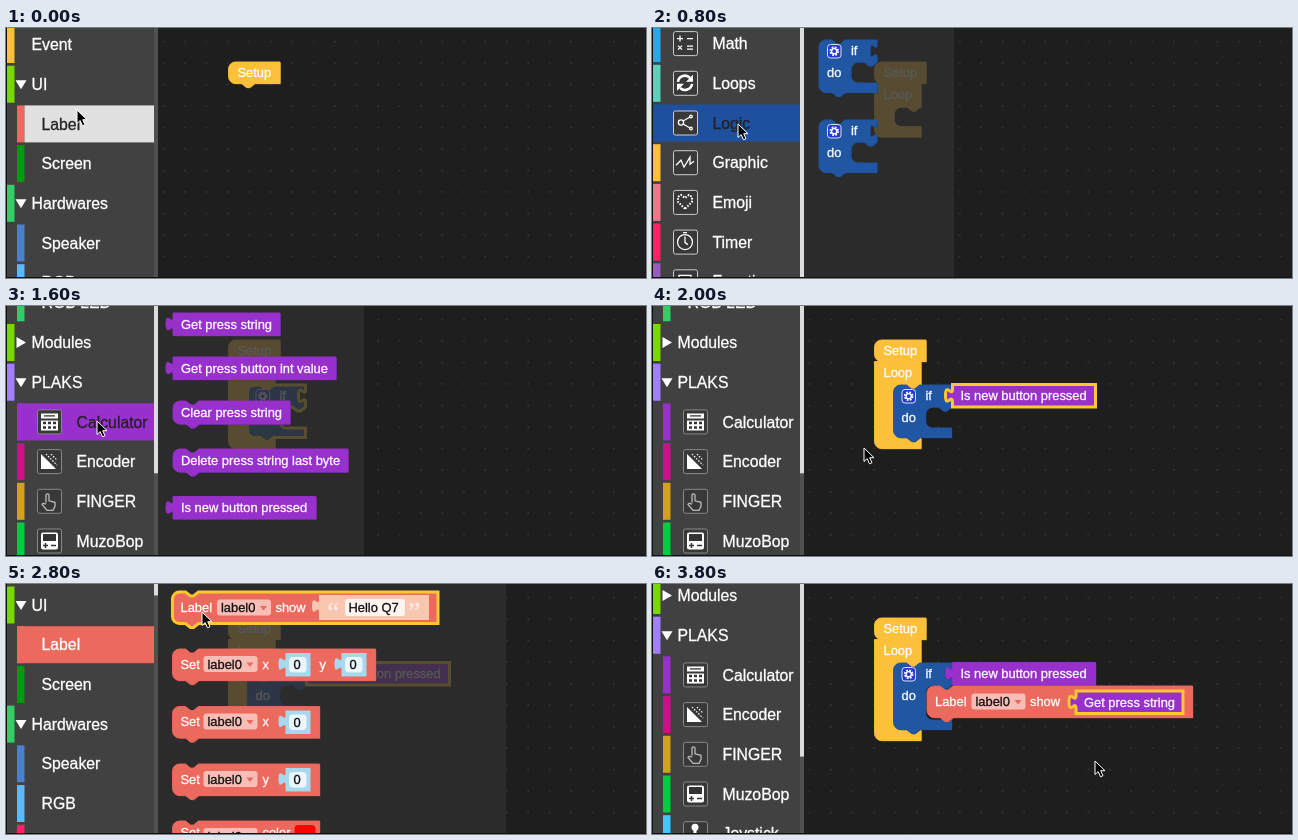
An HTML page for the animation above (4000 ms loop, 640 by 250 pixels).

```html
<!DOCTYPE html>
<html lang="en">
<head>
<meta charset="utf-8">
<title>Block editor</title>
<style>
html, body { margin: 0; width: 100%; height: 100%; overflow: hidden; background: #1e1e1e; }
svg { display: block; width: 640px; height: 250px; }
text { font-family: "Liberation Sans", Arial, sans-serif; font-size: 12.9px; fill: currentColor; stroke: currentColor; stroke-width: .3; white-space: pre; }
.row { font-size: 15.8px; }
.quote { font: 28px "Liberation Serif", serif; }
.icon { fill: none; stroke: #fff; stroke-width: 1.3; }
.icon .solid { fill: #fff; stroke: none; }
</style>
</head>
<body>
<svg viewBox="0 0 640 250">
  <defs>
    <pattern id="dots" x="18" y="3" width="21.45" height="21.5" patternUnits="userSpaceOnUse">
      <rect x="10.3" y="10" width="1.1" height="1.1" fill="#555"/>
    </pattern>
  </defs>
  <rect x="152" width="488" height="250" fill="#1e1e1e"/>
  <rect x="152" width="480" height="250" fill="url(#dots)"/>
  <g id="stage"></g>
  <g id="flyout"></g>
  <g id="sidebar"></g>
  <path d="M0 249.5H640M.5 0V250" stroke="#111"/>
  <g id="top"></g>
</svg>
<script>
const STEP = 200, COUNT = 20, PITCH = 39.7;
const YELLOW = '#fdc03a', BLUE = '#2156a2', PURPLE = '#9830cc', CORAL = '#eb695d', GREEN = '#34cc66';

// --- small svg helpers
const at = (x, y, body, extra = '') => `<g transform="translate(${x} ${y})" ${extra}>${body}</g>`;
const text = (x, y, s, color = '#fff', cls = '') => `<text x="${x}" y="${y}" color="${color}" class="${cls}">${s}</text>`;
const rect = (x, y, w, h, fill, rx = 0, extra = '') => `<rect x="${x}" y="${y}" width="${w}" height="${h}" rx="${rx}" fill="${fill}" ${extra}/>`;

// --- block outlines
const NOTCH = 'l5 4h3l5 -4', NOTCH_BACK = 'l-5 4h-3l-5 -4';
const TAB_DOWN = 'v4.4c0 8.7 -7 -7 -7 6.5s7 -2.2 7 6.5';
const TAB_UP = 'c0 -8.7 -7 7 -7 -6.5s7 2.2 7 -6.5';

function stackPath(w, h, { hat, joined, last, socket, inner } = {}) {
  let d = joined ? 'M0 0' : 'M0 7a7 7 0 0 1 7 -7';
  d += hat ? `H${w}` : `H13${NOTCH}H${w}`;
  if (socket) d += TAB_DOWN;
  if (inner) {
    const { x, y, h: ih } = inner;
    d += `V${y}H${x + 26}${NOTCH_BACK}H${x + 7}a7 7 0 0 0 -7 7v${ih - 14}a7 7 0 0 0 7 7H${w}`;
  }
  return d + `V${h}${last ? '' : 'H26' + NOTCH_BACK}H7a7 7 0 0 1 -7 -7Z`;
}
const valuePath = (w, h) => `M0 0H${w}V${h}H0V17.4${TAB_UP}Z`;

function shape(d, fill, selected) {
  const edge = selected ? 'stroke="#ffc72e" stroke-width="3"' : `stroke="${fill}" stroke-width=".9"`;
  return `<path d="${d}" transform="translate(.8 .8)" fill="${fill}" style="filter:brightness(.7)"/><path d="${d}" fill="${fill}" ${edge}/>`;
}

// --- blocks
const setup = (x, y) => at(x, y, shape(stackPath(51.5, 21.5, { hat: true }), YELLOW) + text(9, 15, 'Setup'));

const loop = (x, y, ih = 19.5, joined = true) => at(x, y,
  shape(stackPath(46.5, 23.5 + ih + 10.5, { joined, last: true, inner: { x: 19.5, y: 23.5, h: ih } }), YELLOW) + text(9, 15.5, 'Loop'));

const GEAR = rect(8.5, 4.5, 13.5, 13.5, '#2737d8', 3, 'stroke="#dde"') +
  '<circle cx="15.2" cy="11.2" r="3.9" fill="none" stroke="#fff" stroke-width="1.8" stroke-dasharray="1.8 1.27"/>' +
  '<circle cx="15.2" cy="11.2" r="2.6" fill="none" stroke="#fff" stroke-width="1.4"/>';

const ifBlock = (x, y, selected, ih = 21) => at(x, y,
  shape(stackPath(58, 22 + ih + 9.5, { socket: true, inner: { x: 32, y: 22, h: ih } }), BLUE, selected) +
  GEAR + text(32, 15, 'if') + text(8, 37, 'do'));

const value = (x, y, s, w, selected) => at(x, y, shape(valuePath(w, 22.5), PURPLE, selected) + text(8, 15.5, s));
const isNew = (x, y, selected) => value(x, y, 'Is new button pressed', 143, selected);
const getString = (x, y, selected) => value(x, y, 'Get press string', 107, selected);

const command = (x, y, s, w) => at(x, y, shape(stackPath(w, 23), PURPLE) + text(8, 15.5, s));

const dropdown = (x, y) => at(x, y, rect(0, 0, 54, 16, '#f7bdb6', 3) + text(4, 12.5, 'label0', '#111') +
  `<path d="M43 6.5h7l-3.5 4.5z" fill="${CORAL}"/>`);

const quoted = (x, y) => at(x, y, `<path d="${valuePath(110, 25)}" fill="#f9c6b0"/>` +
  text(8, 26, '“', '#fdebe3', 'quote') + rect(26, 4, 60, 17, '#fdf4f0', 3) +
  text(29.5, 17, 'Hello Q7', '#111') + text(89, 26, '”', '#fdebe3', 'quote'));

const labelShow = (x, y, selected, withValue = false) => at(x, y,
  shape(stackPath(265.5, 31.5), CORAL, selected) + text(8, 19.5, 'Label') + dropdown(44.5, 7.5) + text(103, 19.5, 'show') +
  (withValue ? '' : quoted(146.5, 3)));

const number = (x, y) => at(x, y, `<path d="${valuePath(25, 23.5)}" fill="#a6d8ee"/>` + rect(3.5, 4, 17.5, 15.5, '#eaf6fb', 4) + text(8, 16, '0', '#111'));

function setLabel(x, y, names, w) {
  let body = shape(stackPath(w, 31.5), CORAL) + text(8, 19.5, 'Set') + dropdown(31, 7);
  names.forEach((n, i) => {
    body += text(90 + i * 57, 19.5, n);
    body += n === 'color' ? rect(122, 4, 21, 20, '#f00', 4) : number(113 + i * 56, 4);
  });
  return at(x, y, body);
}

// --- flyouts: width and contents
const button = (x, y) => at(x, y, shape(stackPath(152, 54, { hat: true, last: true, inner: { x: 20, y: 23.5, h: 19.5 } }), YELLOW) + text(9, 16, 'Button A wasPressed'));
const FLYOUTS = {
  event: [190, () => loop(167, 12, 19.5, false) + button(167, 88)],
  logic: [150, () => ifBlock(167, 12) + ifBlock(167, 92)],
  calc: [206, () => getString(167, 7) + value(167, 51, 'Get press button int value', 163) +
    command(167, 95, 'Clear press string', 117) + command(167, 143, 'Delete press string last byte', 175) + isNew(167, 190.5)],
  label: [348, k => labelShow(166.5, 8, k === 14) + setLabel(166.5, 65, ['x', 'y'], 203) + setLabel(166.5, 122.5, ['x'], 147) +
    setLabel(166.5, 180, ['y'], 147) + setLabel(166.5, 237, ['color'], 147).replace(/y="19.5"/g, 'y="15.5"')]
};
function flyout(name, k) {
  if (!name) return '';
  const [w, draw] = FLYOUTS[name];
  return rect(152, 0, w, 250, 'rgba(47,47,47,.8)') + draw(k);
}

// --- workspace contents at each step
function stage(k) {
  const hasIf = k >= 6, hasLabel = k >= 16;
  let s = setup(222.5, 34);
  if (k >= 2) s += k === 2 ? loop(221, 54.5) : loop(222.5, 55.5, hasLabel ? 67 : hasIf ? 53 : 19.5);
  if (hasIf) s += ifBlock(241.5, 79, k < 9, hasLabel ? 35 : 21);
  if (k >= 10) s += isNew(300.5, 78.5, k < 15);
  if (hasLabel) s += labelShow(275, 102, k < 18, k === 19);
  if (k === 19) s += getString(424, 107, true);
  if (k === 5) s += ifBlock(248, 86, true);
  if (k === 9) s += isNew(307, 86, true);
  if (k === 15) s += labelShow(283, 110, true);
  if (k === 18) s += getString(431, 114, true);
  return s;
}

// --- sidebar rows: name, colour, kind (o open, c closed, s single, i indented), icon
const ICONS = {
  math: '<path d="M4 7.5h6M7 4.5v6M14 7.5h6M5 14.5l4 4M9 14.5l-4 4M14 15h6M14 18h6"/>',
  loops: '<path d="M5 11a7 7 0 0 1 12 -4M19 13a7 7 0 0 1 -12 4" stroke-width="2.6"/><path class="solid" d="M20 4v7h-7zM4 20v-7h7z"/>',
  logic: '<circle cx="8" cy="12" r="2.6"/><path d="M10 10.5l7 -4M10 13.5l7 4"/><circle cx="18" cy="6" r="1.3"/><circle cx="18" cy="18" r="1.3"/>',
  graphic: '<path d="M3 15l5 -5 3 7 6 -10v7l4 -3"/>',
  emoji: '<path d="M12 19l-7 -7v-5l3 -2 4 3 4 -3 3 2v5z" stroke-width="2" stroke-dasharray="1.6 1.4"/>',
  timer: '<circle cx="12" cy="12.5" r="7.5"/><path d="M12 7v6l3 2M10 3h4"/>',
  calc: '<path class="solid" d="M4 4h17v5h-17zM4 11h17v10h-17z"/><path d="M7 6.500h11" stroke="#333"/><path d="M6 13.500h14M6 18h14" stroke="#333" stroke-width="2.5" stroke-dasharray="3 2"/>',
  encoder: '<path class="solid" d="M4 5v15h15z"/><path d="M9 5l11 11M14 5l6 6" stroke-dasharray="1.5 1.5"/>',
  finger: '<path d="M9 14v-8q1.5 -2 3 0v6l6 1.5v4l-2 4h-6l-5 -6q1 -2 4 0" stroke="#bbb"/>',
  game: '<rect class="solid" x="4" y="4" width="17" height="17" rx="2"/><path d="M6 9h13" stroke="#333" stroke-width="7"/><path d="M6 17h5M8.5 14.5v5M14 17h5" stroke="#333" stroke-width="1.5"/>',
  stick: '<circle class="solid" cx="12" cy="6" r="3.5"/><path d="M12 8v8" stroke-width="3"/><path class="solid" d="M4 16h16v4h-16z"/>',
  plain: '<path d="M6 6h12v12h-12zM9 12h6"/>'
};
const ROWS = [
  ['Event', YELLOW, 's'], ['UI', '#78d800', 'o'], ['Label', CORAL, 'i'], ['Screen', '#009a10', 'i'],
  ['Hardwares', GREEN, 'o'], ['Speaker', '#4a80cc', 'i'], ['RGB', '#5cb8ff', 'i'], ['Imu', '#fb2366', 'i'], ['Power', '#f08078', 'i'],
  ['Units', GREEN, 'o'],
  ...['ENV', 'PIR', 'Angle', 'Light', 'Earth', 'Servo', 'Weight', 'Trace', 'Button', 'RGB LED'].map(n => [n, GREEN, 'i']),
  ['Modules', '#78d800', 'c'], ['PLAKS', '#a080ff', 'o'],
  ['Calculator', PURPLE, 'i', 'calc'], ['Encoder', '#cc1088', 'i', 'encoder'], ['FINGER', '#d4a020', 'i', 'finger'],
  ['MuzoBop', '#00cc40', 'i', 'game'], ['Joystick', '#40c8ff', 'i', 'stick'], ['Keyboard', '#4a80cc', 'i', 'plain'],
  ['RFID', '#f08078', 'i', 'plain'], ['Network', '#28a8e8', 's', 'plain'], ['Remote', GREEN, 's', 'plain'],
  ['Execute', '#78d800', 's', 'plain'], ['Variables', '#f08078', 's', 'plain'],
  ['Math', '#28a8e8', 's', 'math'], ['Loops', '#5cd0b8', 's', 'loops'], ['Logic', '#1f50a0', 's', 'logic'],
  ['Graphic', YELLOW, 's', 'graphic'], ['Emoji', '#f07888', 's', 'emoji'], ['Timer', '#fb2366', 's', 'timer'],
  ['Functions', '#9a5cc0', 's', 'plain'], ['Text', '#5cd0b8', 's', 'plain'], ['Lists', '#28a8e8', 's', 'plain']
];

function row([name, color, kind, icon], y, hover, selected) {
  const left = kind === 'i' ? 11 : 1;
  let s = rect(left, y - 18.5, 7.5, 37, color);
  if (selected) s += rect(left, y - 18.5, 137 + 11 - left, 37, color);
  else if (hover) s += rect(left + 7.5, y - 18.5, 140.5 - left, 37, '#e1e1e1');
  if (kind === 'o') s += `<path d="M9.5 ${y - 4}h11l-5.5 9z" fill="#fff"/>`;
  if (kind === 'c') s += `<path d="M10.5 ${y - 5.5}v11l9.5 -5.5z" fill="#fff"/>`;
  if (icon) {
    const frame = rect(.5, .5, 24, 24, hover && !selected ? 'none' : '#383838', 2, `stroke="${kind === 'i' ? '#888' : '#ccc'}" stroke-width="1"`);
    s += at(left + 20, y - 12.5, frame + ICONS[icon], 'class="icon"');
  }
  return s + text(left + (icon ? 59.5 : 24.5), y + 5.6, name, hover ? '#222' : '#fff', 'row');
}

function sidebar({ scroll, hover, sel }) {
  let s = rect(0, 0, 148, 250, '#414141') + rect(148, 0, 4, 250, '#505050');
  if (scroll) s += rect(148, 0, 4, Math.min(250, 4 + scroll * .211), '#dcdcdc');
  ROWS.forEach((r, i) => {
    const y = 16.5 + i * PITCH - scroll;
    if (y > -20 && y < 270) s += row(r, y, r[0] === hover, r[0] === sel);
  });
  return s;
}

// --- pointer
const ARROW = '<path d="M0 0V13.5L3.2 10.6 5.5 15.8 8 14.7 5.7 9.7H10Z" fill="#000" stroke="#fff" stroke-width="1"/>';
const HAND = '<circle r="11" fill="#fff" opacity=".18"/><path d="M-3 6L-6 1Q-6 -1 -3.5 1L-4.5 -4Q-3 -6 -2 -3L-1.5 -5Q0 -7 1 -4L1.5 -5Q3 -6 3.5 -3Q5 -5 6 -2L5 3 4 6Z" fill="#fff" stroke="#222"/><path d="M-2 -3V0M1 -4V0M3.5 -3V0" stroke="#333" stroke-width=".8"/>';

// --- timeline: scroll, pointer x, y, hovered row, selected row, flyout
const NEAR_LOGIC = 1311, NEAR_CALC = 774, NEAR_UI = 35.2, LAST = 799;
const STEPS = [
  [0, 71, 82, 'Label'],
  [0, 58, 20, 'Event', 'Event', 'event'],
  [0, 244, 68],
  [640, 96, 120],
  [NEAR_LOGIC, 86, 96, 'Logic', 'Logic', 'logic'],
  [NEAR_LOGIC, 262, 94],
  [NEAR_LOGIC, 89, 137, 'Graphic'],
  [930, 91, 128],
  [NEAR_CALC, 91, 115, 'Calculator', 'Calculator', 'calc'],
  [NEAR_CALC, 330, 96],
  [NEAR_CALC, 212, 142],
  [450, 112, 176],
  [127, 109, 181],
  [NEAR_UI, 82, 66, 'Label'],
  [NEAR_UI, 196, 28, '', 'Label', 'label'],
  [NEAR_UI, 306, 128],
  [500, 112, 140],
  [LAST, 92, 96, 'Calculator', 'Calculator', 'calc'],
  [LAST, 450, 124],
  [LAST, 443, 177]
];
const DRAGS = [2, 5, 9, 15, 18];
const put = (id, body) => { document.getElementById(id).innerHTML = body; };

let shown = -1;
function tick() {
  const k = Math.floor(performance.now() / STEP) % COUNT;
  if (k !== shown) {
    shown = k;
    const [scroll, x, y, hover, sel, fly] = STEPS[k];
    put('stage', stage(k));
    put('flyout', flyout(fly, k));
    put('sidebar', sidebar({ scroll, hover, sel }));
    put('top', at(x, y, DRAGS.includes(k) ? HAND : ARROW));
  }
  requestAnimationFrame(tick);
}
tick();
</script>
</body>
</html>
```
